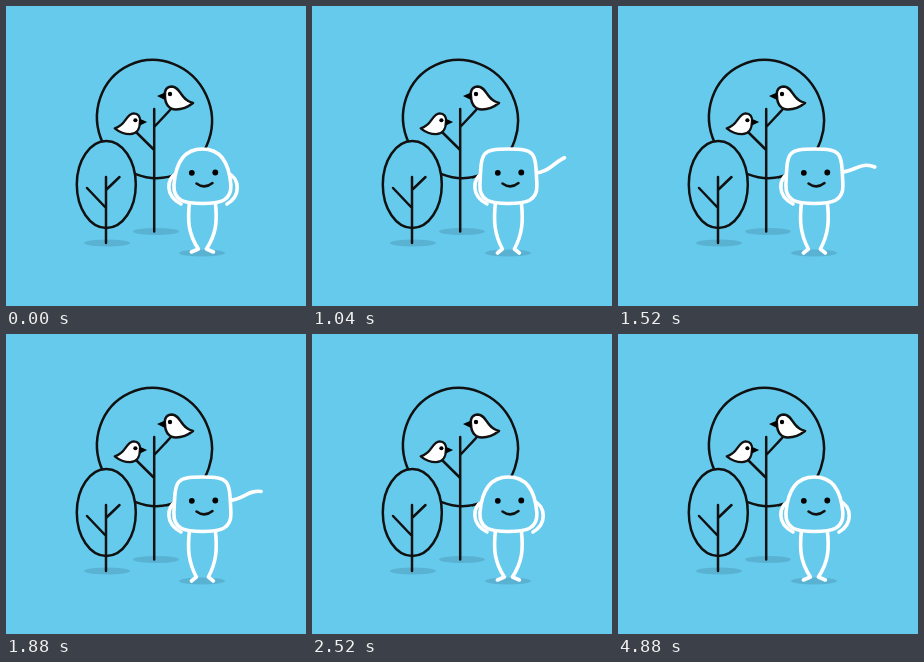
Animation of 300 by 300 pixels, one loop 5.6 s. Source, as an HTML page:

```html
<!DOCTYPE html>
<html lang="en">
<head>
<meta charset="utf-8">
<title>Waving under the trees</title>
<style>
  html, body { margin: 0; width: 100%; height: 100%; overflow: hidden; background: #66caec; }
  svg { display: block; width: 100%; height: 100%; }
  .ink { fill: none; stroke: #111; stroke-width: 2.5; stroke-linecap: round; stroke-linejoin: round; }
  .solid { fill: #66caec; }
  .shade { fill: #5ab2d3; }
  .white { fill: none; stroke: #fff; stroke-width: 3.6; stroke-linecap: round; stroke-linejoin: round; }
</style>
</head>
<body>
<svg viewBox="0 0 300 300">
  <defs>
    <g id="bird">
      <path class="ink" style="fill:#fff" d="M159 90C158 84 161 80.500 166 80.500C175 81 174 94 187 97C182 101 176 103.500 170 103.500C163 103.500 159 98 159 90Z"/>
      <path d="M151 90L159 86.500V94Z"/>
    </g>
  </defs>

  <g class="shade">
    <ellipse cx="101" cy="237" rx="23" ry="3.500"/>
    <ellipse cx="150" cy="225.500" rx="23" ry="3.500"/>
    <ellipse cx="196" cy="247" rx="23" ry="3.500"/>
  </g>

  <g class="ink">
    <ellipse cx="148.500" cy="113" rx="57" ry="59.500" transform="rotate(-25 148.500 113)"/>
    <path d="M148.200 103V225.500M165 103L148.200 121M129 125L148.200 144"/>
    <ellipse class="solid" cx="100.300" cy="178.500" rx="29.500" ry="43.500"/>
    <path d="M100 171V237M81 182L100 202M113.500 171L100 184"/>
  </g>
  <use href="#bird"/>
  <ellipse id="birdEye" cx="164" cy="88" rx="2.200"/>
  <g transform="matrix(-.9 0 0 .9 277 35)">
    <use href="#bird"/>
    <circle cx="164" cy="88" r="2.300"/>
  </g>

  <g class="white">
    <path id="legs"/>
    <path d="M171 167C160 173 159 190 175 198"/>
    <path id="arm"/>
    <path id="head" class="solid"/>
  </g>
  <ellipse class="eye" cx="185.800" cy="166.800" rx="2.900"/>
  <ellipse class="eye" cx="209.300" cy="166.500" rx="2.900"/>
  <path class="ink" d="M190.500 177.500Q198.500 183.500 206.500 177"/>
</svg>
<script>
const LOOP = 5600, STEP = 40, MID = 196.4;
const $ = id => document.getElementById(id);
const eyes = document.querySelectorAll(".eye");
const clamp = x => Math.min(1, Math.max(0, x));
const mix = (a, b, k) => a.map((v, i) => v + (b[i] - v) * k);
const ease = (t, from, to) => (1 - Math.cos(Math.PI * clamp((t - from) / (to - from)))) / 2;

// Shoulder, two control points and hand.
const REST = [222, 167, 234, 173, 235, 190, 221, 198];
const UP = [223, 168, 236, 168, 243, 156, 248, 142];
const FLAT = [223, 166, 236, 166, 243, 155, 257, 161.5];

// Eye openness around a blink centred at mid.
const blink = (t, mid) => 0.3 + 0.7 * clamp((Math.abs(t - mid) - 60) / 60);

// Each half is drawn outwards from MID; side is -1 or 1.
const bothSides = half => half(-1) + half(1);

function draw(t) {
  const stand = ease(t, 360, 900) - ease(t, 2160, 2520);
  const raise = ease(t, 600, 940) - ease(t, 2140, 2400);
  const swing = (1 - Math.cos((t - 940) / 200 * Math.PI)) / 2;
  const wave = t > 940 && t < 2140 ? swing : 0;

  $("head").setAttribute("d", bothSides(side => {
    const x = d => MID + side * d;
    return `M${MID} 143C${x(20 + 8 * stand)} 143 ${x(27)} ${160 - 14 * stand} ${x(28.5)} 179` +
      `C${x(29)} 195 ${x(18)} 197.5 ${MID} 197.5`;
  }));
  $("legs").setAttribute("d", bothSides(side => {
    const x = d => MID + side * d;
    return `M${x(13)} 197C${x(15)} 215 ${x(14)} 228 ${x(4 + 2 * stand)} 243L${x(11)} ${246 + stand}`;
  }));

  const arm = mix(REST, mix(UP, FLAT, wave), raise);
  $("arm").setAttribute("d", `M${arm.slice(0, 2)}C${arm.slice(2)}`);

  const open = Math.min(blink(t, 1360), blink(t, 4120));
  eyes.forEach(eye => eye.setAttribute("ry", 2.9 * open));
  $("birdEye").setAttribute("ry", 2.2 * blink(t, 4760));
}

const start = performance.now();
function frame() {
  const t = (performance.now() - start) % LOOP;
  draw(Math.floor(t / STEP) * STEP);
  requestAnimationFrame(frame);
}
frame();
</script>
</body>
</html>
```
